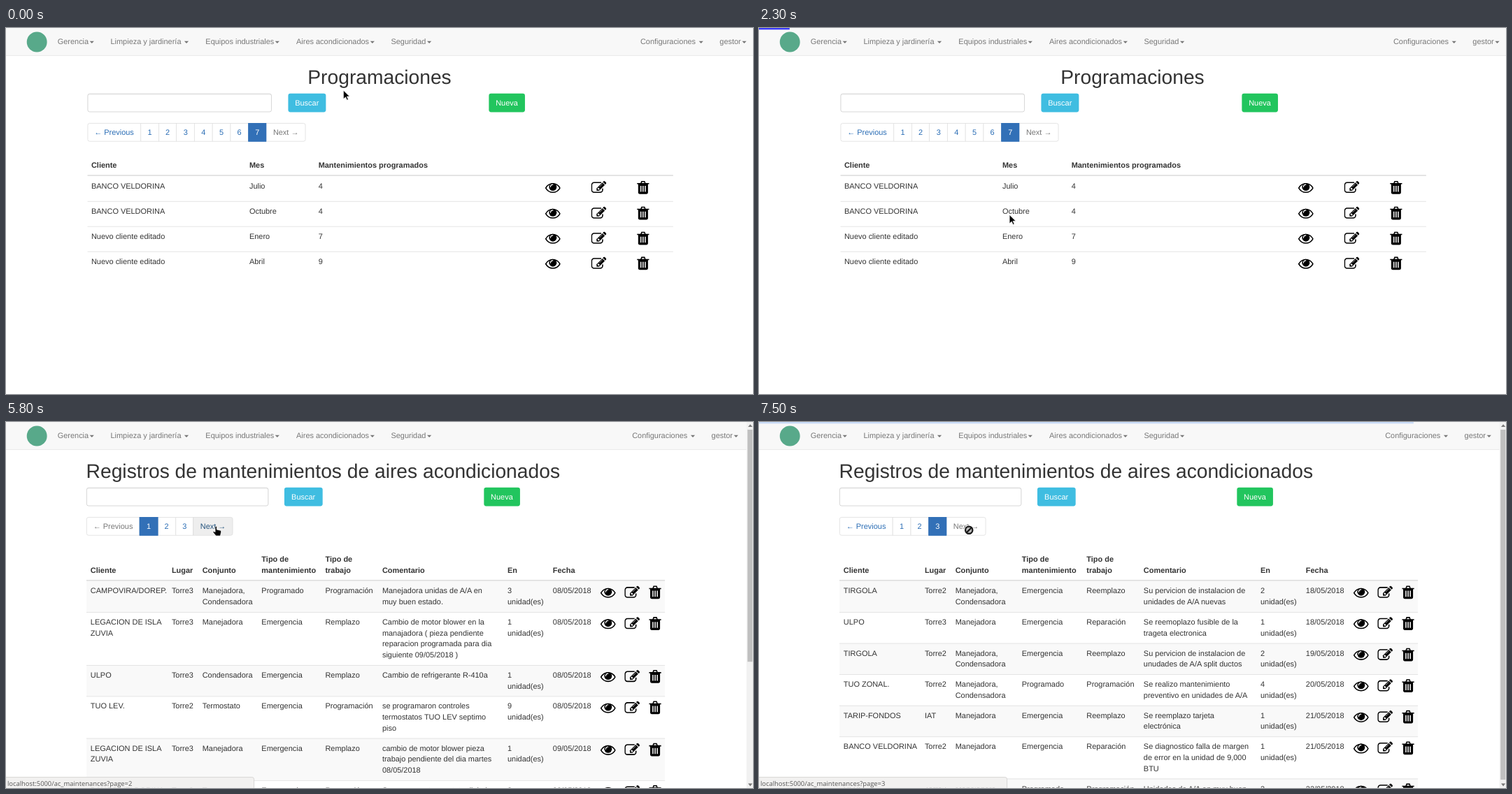
These frames come from a looping animation (1068x524 px, 8000 ms). An HTML page:

```html
<!DOCTYPE html>
<html lang="es">
<head>
<meta charset="utf-8">
<title>Programaciones</title>
<style>
html, body { margin: 0; width: 100%; height: 100%; overflow: hidden; background: #fff; }
#stage {
  position: absolute; left: 0; top: 0; width: 1366px; height: 670.3px; overflow: hidden;
  transform-origin: 0 0; transform: scale(calc(1068 / 1366));
  font: 14px/20px "Liberation Sans", Arial, sans-serif; color: #333;
  text-rendering: geometricPrecision; background: #fff;
}
#stage div, #stage svg { position: absolute; box-sizing: border-box; }
.t { white-space: pre; }
.b { font-weight: bold; }
.h1 { font-size: 36.1px; line-height: 39.6px; top: 70px; white-space: pre; }
.page { left: 0; top: 0; width: 1366px; height: 671px; }
.nav { left: 0; top: 0; width: 1366px; height: 51px; background: #f8f8f8; border-bottom: 1px solid #e7e7e7; }
.item { top: 0; height: 50px; padding: 15px; color: #777; white-space: pre; }
.item::after {
  content: ""; display: inline-block; margin-left: 2px; vertical-align: middle;
  border: 4px solid transparent; border-top-color: currentColor; border-bottom: 0;
}
.item.hot { color: #333; }
.item.open { color: #555; background: #e7e7e7; }
.logo { left: 38px; top: 7px; width: 37px; height: 37px; border-radius: 50%; background: #58a98a; }
.input { top: 119.6px; height: 34px; border: 1px solid #ccc; border-radius: 4px; box-shadow: inset 0 1px 1px rgba(0,0,0,.075); }
.btn { top: 119.6px; height: 34px; padding: 7px 13px; border-radius: 4px; color: #fff; white-space: pre; }
.info { background: #3fbde1; }
.ok { background: #22c55e; }
.pager { display: flex; top: 173.6px; height: 34px; }
.pager span {
  box-sizing: border-box; height: 34px; padding: 6px 12px; border: 1px solid #ddd; margin-left: -1px;
  color: #2a6db5; background: #fff; white-space: pre;
}
.pager span:first-child { margin-left: 0; border-radius: 4px 0 0 4px; }
.pager span:last-child { border-radius: 0 4px 4px 0; }
.pager .on { background: #3270b7; border-color: #3270b7; color: #fff; position: relative; }
.pager .off { color: #777; }
.pager .hot { background: #eee; color: #23527c; }
#menu {
  left: 515.5px; top: 50px; width: 379px; height: 38px; padding: 5px 0; background: #fff;
  border: 1px solid rgba(0,0,0,.18); border-radius: 0 0 4px 4px; box-shadow: 0 6px 12px rgba(0,0,0,.175);
}
#menu p { margin: 0; padding: 3px 20px; white-space: pre; }
#menu.hot p { background: #f5f5f5; color: #262626; }
#status {
  left: -1px; top: 650px; width: 455px; height: 22px; padding: 2px 0 0 2.5px; white-space: pre;
  font: 12px/18px "Open Sans", sans-serif; color: #555;
  background: #f2f1f0; border: 1px solid #d0cfce; border-radius: 0 4px 0 0;
}
#bar { left: 0; top: 0; height: 3px; background: #3c3cf8; }
.track { left: 1354px; top: 0; width: 12px; height: 671px; background: #f1f1f1; z-index: 2; }
.thumb { left: 2px; top: 14px; width: 9px; background: #bfbfbf; }
.arrow { left: 3px; border: 4px solid transparent; }
.up { top: 4px; border-bottom: 5px solid #777; border-top: 0; }
.down { top: 662px; border-top: 5px solid #777; border-bottom: 0; }
</style>
</head>
<body>
<svg width="0" height="0" style="position:absolute">
  <symbol id="eye" viewBox="0 0 28 28">
    <path d="M1 15Q5.5 7 14 7T27 15Q22.5 23 14 23T1 15Z" fill="none" stroke="#000" stroke-width="2"/>
    <circle cx="14" cy="13" r="7"/>
    <path d="M9.7 13A4.3 4.3 0 0 1 14 8.7" fill="none" stroke="#fff" stroke-width="1.5" stroke-linecap="round"/>
  </symbol>
  <symbol id="edit" viewBox="0 0 28 28">
    <path d="M18.5 5h-13A4.5 4.5 0 0 0 1 9.5v9A4.5 4.5 0 0 0 5.5 23h11a4.5 4.5 0 0 0 4.5-4.5V16" fill="none" stroke="#000" stroke-width="2"/>
    <path d="M20.5 5l4.5 4.5L14.5 20H10v-4.5z"/>
    <path d="M21.4 4l1.4-1.4q1.1-.9 2.2 0l2.4 2.4q.9 1.1 0 2.2l-1.5 1.3z"/>
    <path d="M11.5 16.1v.9H13v1.5h.9l1.8-1.8-2.4-2.4z" fill="#fff"/>
    <path d="M20.5 7.5L15 13" stroke="#fff" stroke-width=".8"/>
  </symbol>
  <symbol id="trash" viewBox="0 0 28 28">
    <path d="M3 7h22M10 7l1.5-4h5L18 7" fill="none" stroke="#000" stroke-width="2"/>
    <path d="M5 7h18v15.5q0 3.5-3 3.5H8q-3 0-3-3.5z"/>
    <path d="M10 11v11M14 11v11M18 11v11" stroke="#fff" stroke-width="1.9"/>
  </symbol>
</svg>
<div id="stage"></div>
<script>
const stage = document.getElementById('stage');

function add(parent, cls, style, text) {
  const el = document.createElement('div');
  el.className = cls;
  for (const k in style) el.style[k] = typeof style[k] === 'number' && k !== 'zIndex' ? style[k] + 'px' : style[k];
  if (text) el.textContent = text;
  parent.appendChild(el);
  return el;
}

function icon(parent, name, left, top) {
  parent.insertAdjacentHTML('beforeend',
    `<svg width="28" height="28" style="left:${left}px;top:${top}px"><use href="#${name}"/></svg>`);
}

function pager(page, left, last, current) {
  const el = add(page, 'pager', { left });
  const put = (text, cls) => {
    const s = document.createElement('span');
    s.textContent = text;
    s.className = cls;
    el.appendChild(s);
    return s;
  };
  put('← Previous', current === 1 ? 'off' : '');
  for (let i = 1; i <= last; i++) put(i, i === current ? 'on' : '');
  return put('Next →', current === last ? 'off' : '');
}

function form(page, left, width, search, create) {
  add(page, 'input', { left, width });
  add(page, 'btn info', { left: search }, 'Buscar');
  add(page, 'btn ok', { left: create }, 'Nueva');
}

function table(page, o) {
  const top = 232.6, width = o.right - o.left;
  const lines = s => s.split('\n').length;
  const headLines = Math.max(...o.head.map(lines));
  let y = top + headLines * 20 + 18;
  o.head.forEach((h, i) =>
    add(page, 't b', { left: o.cols[i], top: top + 8 + (headLines - lines(h)) * 20 }, h));
  o.rows.forEach((row, n) => {
    const height = o.rowHeight || Math.max(...row.map(lines)) * 20 + 17;
    add(page, '', {
      left: o.left, top: y, width, height,
      background: o.striped && n % 2 === 0 ? '#f9f9f9' : '#fff',
      borderTop: n ? '1px solid #ddd' : '0'
    });
    row.forEach((s, i) => add(page, 't', { left: o.cols[i], top: y + 8 }, s));
    ['eye', 'edit', 'trash'].forEach((name, i) => icon(page, name, o.icons[i], y + 7.8));
    y += height;
  });
  add(page, '', { left: o.left, top: top + headLines * 20 + 16, width, height: 2, background: '#ddd' });
}

function schedules() {
  const page = add(stage, 'page');
  add(page, 'h1', { left: 0, width: 1366, textAlign: 'center' }, 'Programaciones');
  form(page, 148.5, 337, 515.5, 882.5);
  pager(page, 148.5, 7, 7);
  table(page, {
    left: 148.5, right: 1220, cols: [156, 445, 571.3], icons: [985.5, 1069.5, 1150.5], rowHeight: 46.2,
    head: ['Cliente', 'Mes', 'Mantenimientos programados'],
    rows: [
      ['BANCO VELDORINA', 'Julio', '4'],
      ['BANCO VELDORINA', 'Octubre', '4'],
      ['Nuevo cliente editado', 'Enero', '7'],
      ['Nuevo cliente editado', 'Abril', '9']
    ]
  });
  return { page };
}

function records(current, cols, thumb, rows) {
  const page = add(stage, 'page');
  add(page, 'h1', { left: 146.6 }, 'Registros de mantenimientos de aires acondicionados');
  form(page, 146.6, 333, 509, 873.5);
  const next = pager(page, 146.6, 3, current);
  table(page, {
    left: 146.6, right: 1205.5, icons: [1087.2, 1131.3, 1172.7], striped: true,
    cols: [154.6, ...cols, 917, 1000],
    head: ['Cliente', 'Lugar', 'Conjunto', 'Tipo de\nmantenimiento', 'Tipo de\ntrabajo', 'Comentario', 'En', 'Fecha'],
    rows: rows.map(r => {
      const [units, day] = r.slice(-2);
      return [...r.slice(0, -2), units + '\nunidad(es)', day + '/05/2018'];
    })
  });
  const track = add(page, 'track');
  add(track, 'thumb', { height: thumb });
  add(track, 'arrow up');
  add(track, 'arrow down');
  return { page, next };
}

const EM = 'Emergencia', PR = 'Programado', PN = 'Programación', RP = 'Reparación';
const MA = 'Manejadora', CO = 'Condensadora', MC = MA + ',\n' + CO;

const pages = [
  schedules(),
  records(1, [303, 359, 467.3, 583.8, 688], 425, [
    ['CAMPOVIRA/DOREP.', 'Torre3', MC, PR, PN, 'Manejadora unidas de A/A en\nmuy buen estado.', 3, '08'],
    ['LEGACION DE ISLA\nZUVIA', 'Torre3', MA, EM, 'Remplazo', 'Cambio de motor blower en la\nmanajadora ( pieza pendiente\nreparacion programada para dia\nsiguiente 09/05/2018 )', 1, '08'],
    ['ULPO', 'Torre3', CO, EM, 'Remplazo', 'Cambio de refrigerante R-410a', 1, '08'],
    ['TUO LEV.', 'Torre2', 'Termostato', EM, PN, 'se programaron controles\ntermostatos TUO LEV septimo\npiso', 9, '08'],
    ['LEGACION DE ISLA\nZUVIA', 'Torre3', MA, EM, 'Remplazo', 'cambio de motor blower pieza\ntrabajo pendiente del dia martes\n08/05/2018', 1, '09'],
    ['BANCO VELDORINA', 'Torre2', 'Termostato', EM, RP, 'Se programo termostato digital', 2, '09']
  ]),
  records(2, [252, 308, 417.5, 534, 638], 461, [
    ['ULPO', 'Torre3', MA, EM, RP, 'tuberia de drenaje obstruida', 2, '12'],
    ['BANCO\nVELDORINA', 'Torre2', MA, EM, RP, 'programacion de control termostato', 2, '12'],
    ['TARIP-\nFONDOS', 'IAT', MA + ',\nTermostato', EM, 'Remplazo', 'Se remplazo control termostato. limpieza\nde tuberia de drenaje', 1, '12'],
    ['ULPO', 'Torre3', CO, EM, RP, 'Reparación de tubería de drenaje de 2\nunidades manegadora split ducto de 5\nTON', 2, '15'],
    ['AULA\nBRENTO.', 'Torre2', CO, PR, PN, 'unidad de A/A en exelente estado', 1, '15'],
    ['AULA\nBRENTO.', 'Torre2', MC, PR, PN, 'Se realizo mantenimiento preventivo de la\nunidad A/A split pared de 24,000 BTU', 1, '15'],
    ['ULPO', 'Torre3', CO, EM, 'Reemplazo', 'Se cambio motor fan de condesador', 1, '16']
  ]),
  records(3, [303, 359, 480.7, 599, 703.3], 641, [
    ['TIRGOLA', 'Torre2', MC, EM, 'Reemplazo', 'Su pervicion de instalacion de\nunidades de A/A nuevas', 2, '18'],
    ['ULPO', 'Torre3', MA, EM, RP, 'Se reemoplazo fusible de la\ntrageta electronica', 1, '18'],
    ['TIRGOLA', 'Torre2', MC, EM, 'Reemplazo', 'Su pervicion de instalacion de\nunudades de A/A split ductos', 2, '19'],
    ['TUO ZONAL.', 'Torre2', MC, PR, PN, 'Se realizo mantenimiento\npreventivo en unidades de A/A', 4, '20'],
    ['TARIP-FONDOS', 'IAT', MA, EM, 'Reemplazo', 'Se reemplazo tarjeta\nelectrónica', 1, '21'],
    ['BANCO VELDORINA', 'Torre2', MA, EM, RP, 'Se diagnostico falla de margen\nde error en la unidad de 9,000\nBTU', 1, '21'],
    ['ULPO', 'Torre2', MA, PR, PN, 'Unidades de A/A en muy buen', 3, '22']
  ])
];

const nav = add(stage, 'nav');
add(nav, 'logo');
const item = (x, text) => add(nav, 'item', { left: x - 15 }, text);
item(94.3, 'Gerencia');
item(191.2, 'Limpieza y jardinería ');
item(365, 'Equipos industriales');
const airItem = item(530.8, 'Aires acondicionados');
item(704, 'Seguridad');
const settings = item(1160, 'Configuraciones ');
const account = item(1305, 'gestor');

const overlay = add(stage, 'page', { zIndex: 3 });
const menu = add(overlay, '');
menu.id = 'menu';
menu.innerHTML = '<p>Registros de mantenimientos de aires acondicionados</p>';
const bar = add(overlay, '');
bar.id = 'bar';
const status = add(overlay, '');
status.id = 'status';

// Pointer shapes; each one has its hot spot at 0,0.
const beam = 'M-3-8Q0-8 0-6Q0-8 3-8M0-6V6M-3 8Q0 8 0 6Q0 8 3 8';
const shapes = {
  arrow: '<path d="M0 0V16L4 12.5 6.5 18 9 17 6.5 11.5H11.5Z" stroke="#fff" stroke-width=".9"/>',
  hand: '<path d="M-1.5 1.5a1.5 1.5 0 0 1 3 0V6L8 7.5q2 .5 1.5 2.5l-1 5-.5 2.5H0l-5-6q-1-1.5.7-2.3l2.8 1.3Z" stroke="#fff" stroke-width=".9"/>',
  text: `<g fill="none"><path d="${beam}" stroke="#fff" stroke-width="3"/><path d="${beam}" stroke="#222" stroke-width="1.3"/></g>`,
  denied: '<circle r="9" fill="#fff" opacity=".7"/><g stroke="#1a1a1a" stroke-width="2.9"><circle r="6.6" fill="#bbb"/><path d="M-4.5 4.5l9-9"/></g>'
};
overlay.insertAdjacentHTML('beforeend', '<svg id="pointer" width="40" height="40" viewBox="-20 -20 40 40"></svg>');
const pointer = document.getElementById('pointer');

// [time, shape, x, y] in stage pixels
const moves = [
  [0, 'arrow', 482.5, 89], [300, 'arrow', 472, 70], [400, 'arrow', 448, 42], [500, 'hand', 422, 15],
  [1100, 'hand', 426, 28], [1200, 'hand', 437, 45], [1300, 'hand', 446, 53],
  [1800, 'arrow', 437, 78], [1900, 'arrow', 419, 120], [2000, 'arrow', 400, 166],
  [2100, 'arrow', 383, 210], [2200, 'arrow', 369, 244], [2300, 'arrow', 358, 267],
  [2400, 'arrow', 275, 269], [2500, 'text', 189, 267.5], [4700, 'arrow', 304, 121],
  [5200, 'hand', 300.3, 149.5], [7500, 'denied', 300, 155]
];
const AC = 'localhost:5000/ac_maintenances';
// [time, opacity, text]
const links = [
  [0, 0, ''], [700, .5, 'localhost:5000/schedules?page=7#'], [800, 1, 'localhost:5000/schedules?page=7#'],
  [1200, 1, AC], [1800, .5, AC], [1900, 0, ''], [5800, 1, AC + '?page=2'], [6400, 1, AC + '?page=3']
];
// [time, width, opacity, colour]
const loads = [
  [0, 0, 0, '#3c3cf8'], [2300, 56.3, 1, '#3c3cf8'], [2400, 106, 1, '#3c3cf8'], [2500, 1208.7, 1, '#3c3cf8'],
  [4700, 0, 0, '#3c3cf8'], [6400, 1196, .35, '#3c3cf8'], [6900, 0, 0, '#3c3cf8'], [7500, 1197, .25, '#3c88f8']
];
const views = [[0, 0], [2500, 1], [6400, 2], [7500, 3]];

const at = (list, t) => list.findLast(k => k[0] <= t);
let shape = '';

function draw(t) {
  const view = at(views, t)[1];
  pages.forEach((p, i) => {
    p.page.style.display = i === view ? 'block' : 'none';
    if (p.next && i < 3) p.next.className = t >= 5800 ? 'hot' : '';
  });
  const shift = view ? -15 : 0;
  settings.style.left = 1145 + shift + 'px';
  account.style.left = 1290 + shift + 'px';
  nav.style.width = (view ? 1354 : 1366) + 'px';

  const open = t >= 1000 && t < 1700;
  airItem.className = 'item' + (open ? ' open' : t >= 500 && t < 1000 ? ' hot' : '');
  menu.style.display = open ? 'block' : 'none';
  menu.className = t >= 1200 ? 'hot' : '';

  const [, alpha, link] = at(links, t);
  status.style.opacity = alpha;
  status.textContent = link;

  const [, width, opacity, colour] = at(loads, t);
  bar.style.width = width + 'px';
  bar.style.opacity = opacity;
  bar.style.background = colour;

  const [, kind, x, y] = at(moves, t);
  if (kind !== shape) pointer.innerHTML = shapes[shape = kind];
  pointer.style.left = x * 1366 / 1068 - 20 + 'px';
  pointer.style.top = y * 1366 / 1068 - 20 + 'px';
}

function frame() {
  draw(performance.now() % 8000);
  requestAnimationFrame(frame);
}
frame();
</script>
</body>
</html>
```
